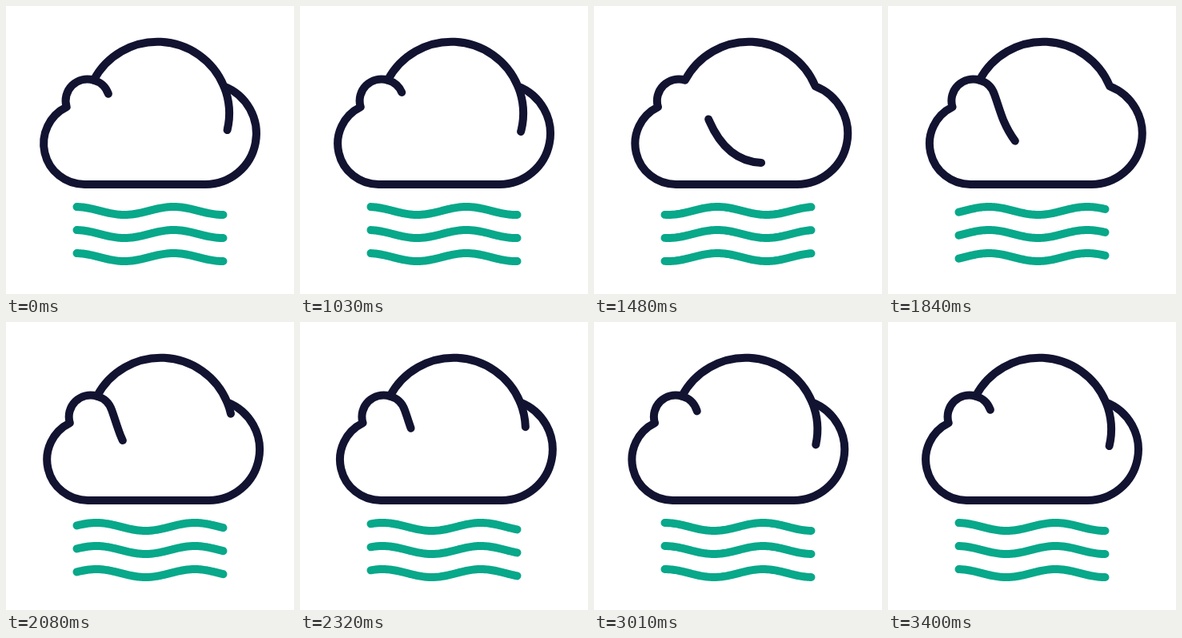
These frames come from a looping animation (360x360 px, 3.43 s). An HTML page:

```html
<!DOCTYPE html>
<html lang="en">
<head>
<meta charset="utf-8">
<title>Foggy cloud</title>
<style>
  html, body { margin: 0; width: 100%; height: 100%; overflow: hidden; background: #fff; }
  svg { display: block; width: 100vw; height: 100vh; }
  path { fill: none; stroke-width: 10; stroke-linecap: round; stroke-linejoin: round; }
  #cloud path { stroke: #121331; }
  #waves path { stroke: #08a88a; }
</style>
</head>
<body>
<svg viewBox="0 0 360 360">
  <g id="cloud">
    <path d="M98.2 223H249.2A63.5 63.5 0 0 0 272.4 100.3A90 90 0 0 0 109.6 92.7A27 27 0 0 0 75.7 126.2A51 51 0 0 0 98.2 223Z"/>
    <path id="fold"/>
  </g>
  <g id="waves">
    <path/>
    <path transform="translate(0 29)"/>
    <path transform="translate(0 58)"/>
  </g>
</svg>
<script>
const LOOP = 3430, START = 1000, PEAK = 1720, FOLD_END = 3300, END = 3400, STEP = 30;
const cloud = document.getElementById('cloud');
const fold = document.getElementById('fold');
const waves = document.querySelectorAll('#waves path');

// Inner line: right rim, across the belly, up to the small bump.
const rim = 'M272.4 100.3A90 90 0 0 1 276.6 155';
const belly = rim + 'C270 180 240 196 208 196C172 196 152 172 139.5 143C135.5 133 132 121 128 110';
const lengthOf = d => {
  fold.setAttribute('d', d);
  return fold.getTotalLength();
};
const front = lengthOf(rim);
const gap = lengthOf(belly) - front;
const dash = 91;
fold.setAttribute('d', belly + 'A27 27 0 0 0 109.6 92.7');
fold.setAttribute('stroke-dasharray', dash + ' ' + gap);

// Easing with horizontal ends: cubic-bezier(x1, 0, x2, 1).
function ease(u, x1, x2) {
  if (u <= 0) return 0;
  if (u >= 1) return 1;
  let lo = 0, hi = 1;
  for (let i = 0; i < 30; i++) {
    const s = (lo + hi) / 2, r = 1 - s;
    if (3 * x1 * s * r * r + 3 * x2 * s * s * r + s * s * s < u) lo = s;
    else hi = s;
  }
  return lo * lo * (3 - 2 * lo);
}

const span = (t, a, b) => (t - a) / (b - a);

function wavePath(phase) {
  const pts = [];
  for (let x = 88.5; x <= 271.5; x += 1.5) {
    const y = 256 - 5 * Math.cos(2 * Math.PI * ((x - 86.5) / 123 + phase));
    pts.push(x + ' ' + y.toFixed(2));
  }
  return 'M' + pts.join('L');
}

function draw(time) {
  const t = Math.floor((time - 10) / STEP) * STEP + 10;

  const drift = 4.9 * (ease(span(t, START, PEAK), 0.33, 0.4) - ease(span(t, PEAK, END), 0.33, 0.4));
  cloud.setAttribute('transform', `translate(${drift.toFixed(3)} 0)`);

  const travel = ease(span(t, START, FOLD_END), 0.1, 0) * (dash + gap);
  fold.setAttribute('stroke-dashoffset', dash - front - travel);

  const d = wavePath(ease(span(t, START, END), 0.06, 0.215));
  waves.forEach(w => w.setAttribute('d', d));
}

const origin = performance.now();
function tick() {
  draw((performance.now() - origin) % LOOP);
  requestAnimationFrame(tick);
}
tick();
</script>
</body>
</html>
```
